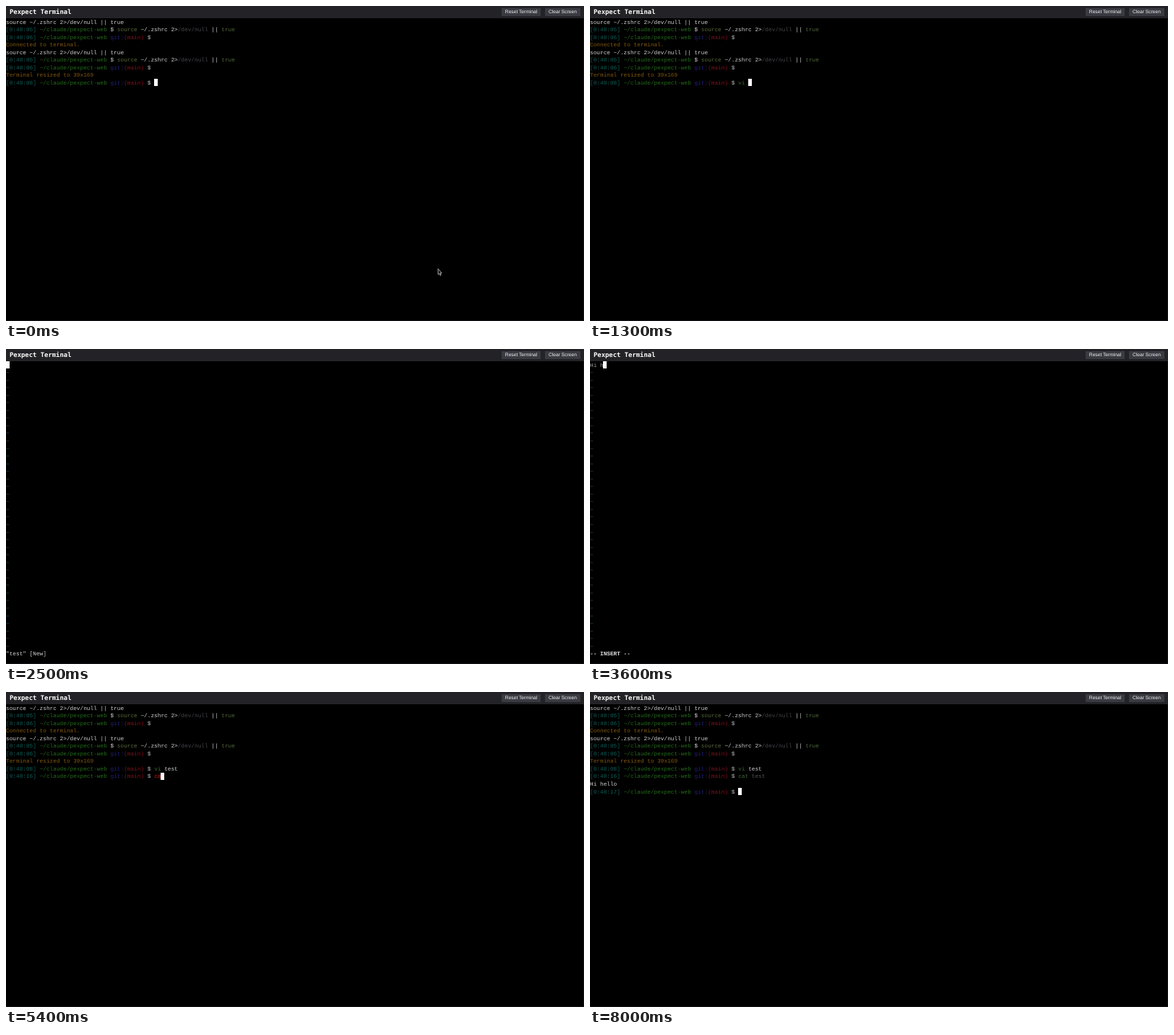
Recreate the animation shown at these times as an HTML page. Size 800 by 437 pixels, loop 8.6 s.

```html
<!DOCTYPE html>
<html lang="en">
<head>
<meta charset="utf-8">
<title>Pexpect Terminal</title>
<style>
  html, body { margin: 0; width: 100%; height: 100%; overflow: hidden; background: #000; }
  body { position: relative; text-rendering: geometricPrecision; }
  header { position: absolute; inset: 0 0 auto; height: 17px; background: #232327; }
  h1 { position: absolute; left: 5px; top: 1px; margin: 0; white-space: pre; color: #fff;
       font: bold 8.9px/16px "DejaVu Sans Mono", monospace; }
  .button { position: absolute; top: 3px; height: 11px; background: #3a3a42; color: #f4f4f4;
            text-align: center; white-space: nowrap;
            font: 6.67px/11px "Liberation Sans", sans-serif; }
  #screen { position: absolute; left: 0; top: 18.5px; margin: 0; color: #d0d0d0;
            font: 7.78px/10.55px "Liberation Mono", monospace; }
  #caret { position: absolute; width: 5px; height: 10px; background: #fff; }
  #pointer { position: absolute; left: 0; top: 0; width: 8px; height: 12px; overflow: visible; }
  #edge { position: absolute; inset: 17px 0 0; border: solid #101018; border-width: 0 1px 1px 0; }
  .time { color: #0c6058; }
  .path { color: #246c1c; }
  .git { color: #20207c; }
  .branch { color: #80101c; }
  .dollar { color: #b8b8b8; }
  .info { color: #80580c; }
  .command { color: #58683c; }
  .program { color: #3c6830; }
  .file { color: #48444c; }
  .builtin { color: #50683c; }
  .argument { color: #505050; }
  .error { color: #d01810; }
  .tilde { color: #285068; }
  .typed { color: #989898; }
  .mode { font-weight: bold; color: #dcdcdc; }
</style>
</head>
<body>
<div id="edge"></div>
<header>
  <h1>Pexpect Terminal</h1>
  <div class="button" style="left:686px;width:54px">Reset Terminal</div>
  <div class="button" style="left:746px;width:49px">Clear Screen</div>
</header>
<pre id="screen"></pre>
<div id="caret"></div>
<svg id="pointer"><path d="M.5 .5V8.5L2.2 7L3.4 9.8L4.7 9.2L3.5 6.5H5.6Z" fill="#111" stroke="#c8c8c8" stroke-width=".8"/></svg>
<script>
const LOOP = 8600, CELL = 4.67, ROW = 10.55, TOP = 17, ROWS = 39, PROMPT_COLS = 44;
const screenEl = document.getElementById('screen');
const caret = document.getElementById('caret');
const pointer = document.getElementById('pointer');

const span = (kind, text) => `<span class="${kind}">${text}</span>`;
const promptStart = time =>
  `${span('time', `[0:48:${time}]`)} ${span('path', '~/claude/pexpect-web')} `;
const prompt = time =>
  `${promptStart(time)}${span('git', 'git:')}${span('branch', '(main)')} ${span('dollar', '$')} `;

const login = [
  'source ~/.zshrc 2&gt;/dev/null || true',
  `${promptStart('05')}$ ${span('command', 'source')} ~/.zshrc 2&gt;${span('file', '/dev/null')} || ${span('builtin', 'true')}`,
  prompt('06')
];
const history = [...login, span('info', 'Connected to terminal.'), ...login,
  span('info', 'Terminal resized to 39x169')];

// Each entry: start time in ms, text present from then on.
const viCommand = [[0, ''], [1000, 'v'], [1100, 'vi'], [1200, 'vi '], [1400, 'vi t'],
  [1500, 'vi te'], [1600, 'vi tes'], [1700, 'vi test']];
const note = [[2000, ''], [2900, 'H'], [3100, 'Hi '], [3600, 'Hi h'], [3800, 'Hi he'],
  [3900, 'Hi hel'], [4000, 'Hi hell'], [4100, 'Hi hello']];
const quitCommand = [[0, ''], [4700, ':'], [4800, ':w'], [4900, ':wq']];
const catCommand = [[0, ''], [5200, 'c'], [5400, 'ca'], [5600, 'cat'], [5800, 'cat '],
  [5900, 'cat t'], [6000, 'cat te'], [6100, 'cat test']];
const textAt = (steps, t) => steps.filter(([start]) => start <= t).pop()[1];

// The shell marks an unfinished command name as an error.
function highlight(text, program, argumentKind) {
  const [name, ...rest] = text.split(' ');
  const kind = name === program ? 'program' : 'error';
  return span(kind, name) + (rest.length ? ' ' + span(argumentKind, rest.join(' ')) : '');
}

function shell(t) {
  const vi = textAt(viCommand, t);
  const lines = [...history, prompt('08') + highlight(vi, 'vi', '')];
  if (t < 1900) return { lines, row: 8, col: PROMPT_COLS + vi.length };
  if (t < 2000) return { lines, row: 9, col: 0 };
  const cat = textAt(catCommand, t);
  lines.push(prompt('16') + highlight(cat, 'cat', 'argument'));
  if (t < 6300) return { lines, row: 9, col: PROMPT_COLS + cat.length };
  if (t < 6400) return { lines, row: 10, col: 0 };
  lines.push('Hi hello', prompt('17'));
  return { lines, row: 11, col: PROMPT_COLS };
}

function editor(t) {
  const text = textAt(note, t), quit = textAt(quitCommand, t);
  const inserting = t >= 2800 && t < 4300;
  const status = t < 2800 ? '"test" [New]' : inserting ? span('mode', '-- INSERT --') : quit;
  const lines = [span('typed', text), ...Array(ROWS - 2).fill(span('tilde', '~')), status];
  if (quit) return { lines, row: ROWS - 1, col: quit.length };
  return { lines, row: 0, col: inserting ? text.length : Math.max(0, text.length - 1) };
}

let shown = '';
function draw(now) {
  const t = now % LOOP;
  const { lines, row, col } = t >= 2000 && t < 5000 ? editor(t) : shell(t);
  const html = lines.join('\n');
  if (html !== shown) screenEl.innerHTML = shown = html;
  caret.style.left = Math.floor(col * CELL) + 'px';
  caret.style.top = Math.round(TOP + row * ROW) + 'px';

  const p = Math.min(1, Math.floor(t / 100) / 7);
  const eased = p * p * (3 - 2 * p);
  pointer.style.display = t < 1000 ? '' : 'none';
  pointer.style.transform = `translate(${597.5 - 97 * eased}px, ${364 - 100 * eased}px)`;
}

const start = performance.now();
function tick() {
  draw(performance.now() - start);
  requestAnimationFrame(tick);
}
tick();
</script>
</body>
</html>
```
